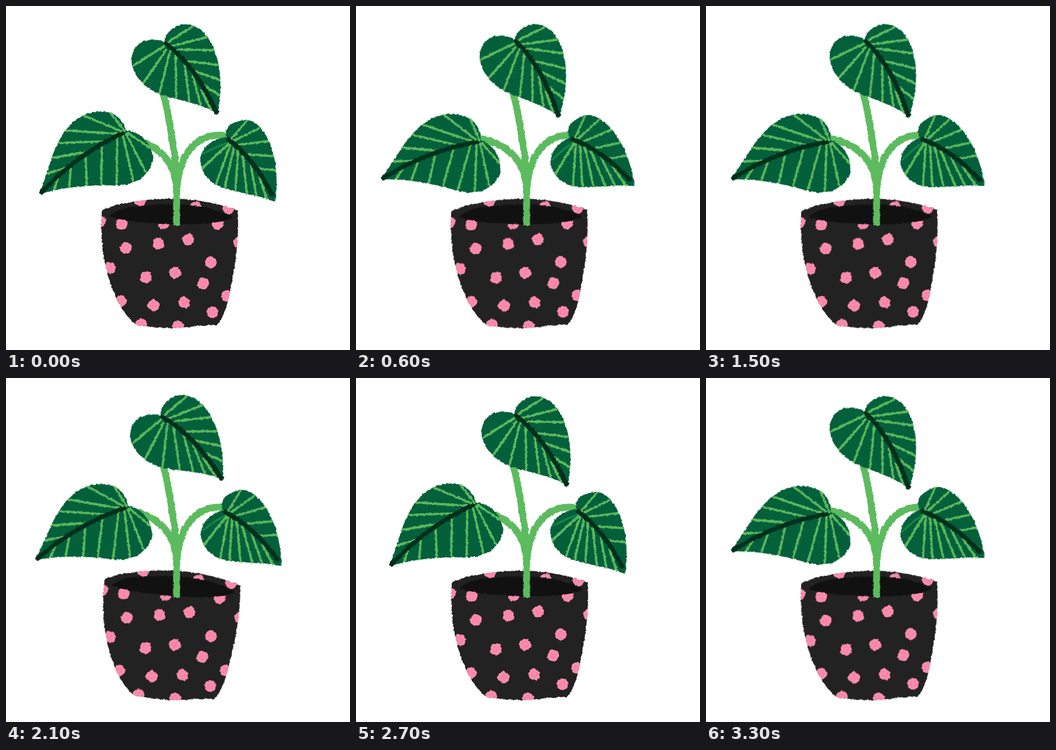
An HTML page that plays this animation: 600x600 px, repeating every 3.6 s.

```html
<!DOCTYPE html>
<html lang="en">
<head>
<meta charset="utf-8">
<title>Potted plant</title>
<style>
  html, body { margin: 0; width: 100%; height: 100%; overflow: hidden; background: #fff; }
  svg { display: block; width: 600px; height: 600px; }
  .sway {
    transform-box: view-box;
    animation: sway 900ms step-end infinite;
  }
  /* Three held poses: rest, mid, far */
  @keyframes sway {
    0% { transform: none; }
    33.333% { transform: rotate(var(--mid)); transform-origin: var(--mid-pivot); }
    66.666% { transform: rotate(var(--far)); transform-origin: var(--far-pivot); }
  }
  #pot { --mid: 2.7deg; --mid-pivot: 291px 455px; --far: -.7deg; --far-pivot: 300px 450px; }
  #top { --mid: -7.5deg; --mid-pivot: 293px 114px; --far: 6.6deg; --far-pivot: 314px 64px; }
  #left { --mid: 6deg; --mid-pivot: 156px 254px; --far: 15deg; --far-pivot: 149px 258px; }
  #right { --mid: -9.3deg; --mid-pivot: 392px 266px; --far: -16.2deg; --far-pivot: 381px 269px; }
  .blade { fill: #03603b; }
  .veins { fill: none; stroke: #5cb85c; stroke-width: 4; stroke-linecap: round; }
  .veins .dim { stroke: #168a48; stroke-width: 3; }
  .rib { fill: none; stroke: #022f1c; stroke-width: 8; stroke-linecap: round; }
  .stems { fill: none; stroke: #5dbb5f; stroke-width: 12; }
</style>
</head>
<body>
<svg viewBox="0 0 600 600">
  <defs>
    <filter id="rough" x="-5%" y="-5%" width="110%" height="110%" color-interpolation-filters="sRGB">
      <feTurbulence type="fractalNoise" baseFrequency=".22" numOctaves="2" seed="4"/>
      <feDisplacementMap in="SourceGraphic" scale="4" xChannelSelector="R" yChannelSelector="G"/>
    </filter>
    <clipPath id="pot-clip"><use href="#pot-body"/></clipPath>
    <g id="dot">
      <path fill="#fb8bad" d="M-6-9L0-10 6-9 9-5 10 1 8 7 3 10-4 9-9 6-10 0-9-6Z"/>
      <path fill="none" stroke="#e8769b" stroke-width="1.2" d="M-6 1l3 3M0-3l4 1M2 4l3-1M-4-5l2 1"/>
    </g>
  </defs>

  <g id="pot" class="sway" filter="url(#rough)">
    <path id="pot-body" fill="#222" d="M167 356C205 340 255 336 291 336C330 336 380 346 404 357C407 400 401 445 395 475Q385 540 368 556Q340 557 298 562Q250 560 230 557C205 545 180 490 172 445Q164 400 167 356Z"/>
    <g id="dots" clip-path="url(#pot-clip)"></g>
    <path fill="#111" d="M181 367C190 350 250 346 291 346C340 346 380 358 395 368C385 378 340 381 297 381C250 380 205 376 181 367Z"/>
  </g>

  <g class="stems" filter="url(#rough)">
    <path d="M297.500 383V310C297 270 286 195 273 148"/>
    <path d="M214 231C255 237 293 264 297 312"/>
    <path d="M297.500 325C300 270 325 218 384 226"/>
  </g>

  <g id="leaves"></g>
</svg>

<script>
  const dots = [
    [234, 339], [331, 351], [388, 353], [164, 375], [202, 380], [275, 379], [369, 380],
    [209, 422], [266, 414], [318, 407], [407, 413], [181, 457], [244, 473], [295, 465],
    [357, 447], [344, 484], [386, 506], [200, 515], [257, 522], [311, 517], [360, 534],
    [236, 555], [300, 559]
  ];

  const leaves = [
    {
      id: 'left',
      blade: 'M209 217C204 196 188 183 165 184C120 185 97 220 82 258Q70 295 59 328C110 314 150 312 195 313C242 311 256 280 256 264C254 240 235 219 209 217Z',
      veins: 'M206 217L182 186M200 218L133 190M195 223L103 217M172 236L90 239M144 254L80 265M112 280L72 292M213 222L255 250M210 224L246 294M204 226L223 310M194 230L193 314M167 247L166 314M139 263L141 315M113 281L110 319M92 297L83 323',
      rib: 'M203 222Q122 260 62 325'
    },
    {
      id: 'right',
      blade: 'M384 229C380 210 398 199 419 199C445 200 464 238 470 275Q474 310 470 342C440 329 410 328 375 316C352 306 339 288 339 268C340 245 362 231 384 229Z',
      veins: 'M393 232L422 198M397 235L446 211M407 242L463 235M420 259L470 262M438 283L474 287M389 240L342 283M392 241L366 311M398 244L381 319M405 250L400 324M413 261L420 328M427 278L437 332M442 298L455 337',
      dim: 'M388 237L342 258',
      rib: 'M388 233Q432 266 464 329'
    },
    {
      id: 'top',
      blade: 'M276 63C279 45 295 32 313 32C352 33 373 84 374 130Q374 160 370 188C345 172 300 164 268 154C240 142 219 118 219 95C219 66 247 50 276 63Z',
      veins: 'M283 63L325 36M289 70L352 54M300 76L365 77M315 96L372 103M328 113L375 130M343 137L375 157M276 70L219 106M279 77L237 138M286 79L267 155M296 85L297 164M312 104L320 170M326 122L341 178M341 147L359 185',
      rib: 'M279 66Q327 100 367 185'
    }
  ];

  const leafMarkup = ({ id, blade, veins, dim, rib }) => `
    <g id="${id}" class="sway" filter="url(#rough)">
      <clipPath id="${id}-clip"><path d="${blade}"/></clipPath>
      <path class="blade" d="${blade}"/>
      <g class="veins" clip-path="url(#${id}-clip)">
        ${dim ? `<path class="dim" d="${dim}"/>` : ''}
        <path d="${veins}"/>
      </g>
      <path class="rib" d="${rib}"/>
    </g>`;

  document.getElementById('dots').innerHTML =
    dots.map(([x, y], i) => `<use href="#dot" transform="translate(${x} ${y}) rotate(${i * 67})"/>`).join('');
  document.getElementById('leaves').innerHTML = leaves.map(leafMarkup).join('');
</script>
</body>
</html>
```
